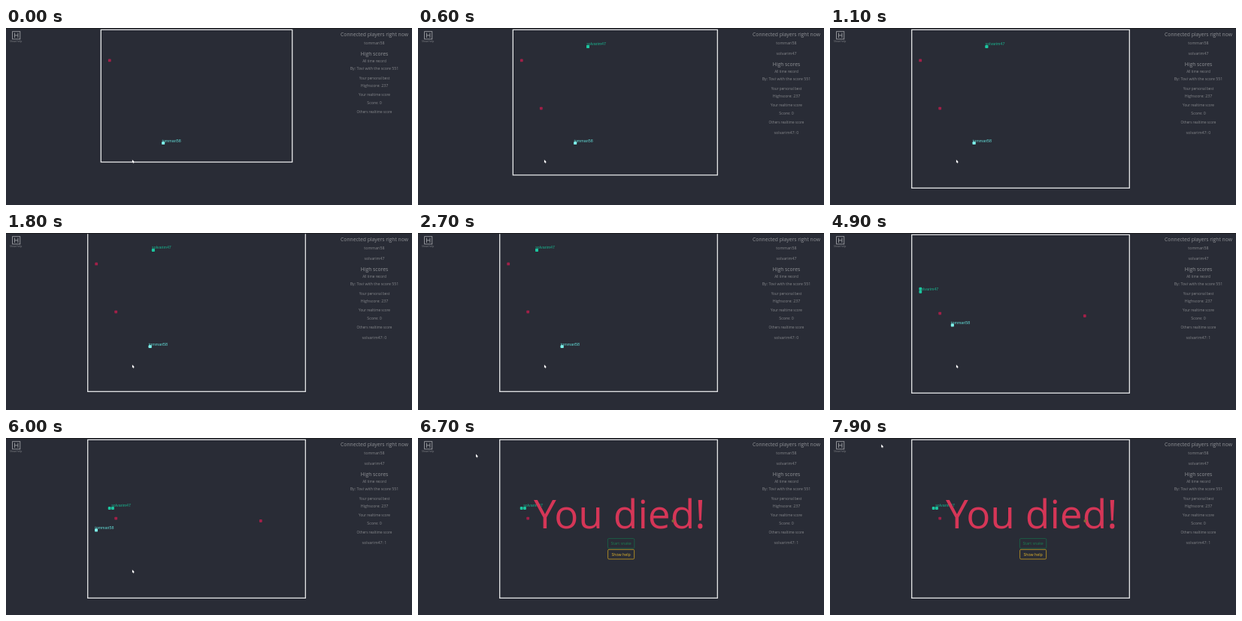
An HTML page that plays this animation: 540 px wide and 237 px high, repeating every 8000 ms.

```html
<!DOCTYPE html>
<html lang="en">
<head>
<meta charset="utf-8">
<title>Multiplayer snake</title>
<style>
  html, body { margin: 0; width: 100%; height: 100%; overflow: hidden; background: #292c36; }
  svg { display: block; width: 100%; height: 100%; }
  text { font-family: "Open Sans", "Noto Sans", sans-serif; font-size: 5.28px; }
  .side text { fill: #85878b; text-anchor: middle; }
  .side .title { font-size: 6.74px; fill: #919397; }
  .side .sub { font-size: 4.67px; }
  .label { font-family: "Liberation Sans", Arial, sans-serif; font-size: 5.35px; }
  .mid { text-anchor: middle; }
</style>
</head>
<body>
<svg viewBox="0 0 540 237">
  <defs><clipPath id="view"><rect y="1.2" width="540" height="236"/></clipPath></defs>
  <rect width="540" height="237" fill="#292c36"/>
  <rect width="540" height="1.1" fill="#1c1d21"/>

  <g fill="none" stroke="#a9abae" stroke-width=".8">
    <rect x="8.6" y="4.7" width="10.2" height="10.2"/>
    <path d="M11.5 6.6V13M15.9 6.6V13M11.5 9.8H15.9"/>
  </g>
  <text class="mid" x="13.2" y="18.8" fill="#85878b" style="font-size:3.4px">Show help</text>

  <g class="side" id="side"></g>

  <g clip-path="url(#view)">
    <g id="board">
      <rect id="frame" x="108.7" y="2.3" fill="none" stroke="#e6e7e9" stroke-width="1.3"/>
      <g id="pieces"></g>
    </g>
  </g>

  <g id="died">
    <text class="mid" x="268.3" y="120.6" fill="#d53657" style="font-size:53.2px">You died!</text>
    <rect x="337.6" y="109.3" width="3.4" height="3.4" rx=".8" fill="#806a38"/>
    <rect x="252.4" y="134.6" width="35.4" height="13.2" rx="1.4" fill="none" stroke="#17694a" stroke-width=".8"/>
    <text class="mid" x="270.1" y="143.1" fill="#1a8154">Start snake</text>
    <rect x="252.6" y="149.3" width="35" height="12.8" rx="1.4" fill="none" stroke="#c79c22" stroke-width=".8"/>
    <text class="mid" x="270.1" y="157.6" fill="#e2b52c">Show help</text>
  </g>

  <path id="cursor" d="M0 0V4.3L1 3.5L1.7 5L2.4 4.7L1.8 3.3H3.1Z" fill="#fff"/>
</svg>
<script>
const LOOP = 8000, TICK = 100;
const JOIN = 200, CENTERED = 1100, ATE = 4000, DEATH = 6400;
const ME = "tommari58", RIVAL = "solvarim47";
const $ = id => document.getElementById(id);

function add(parent, tag, attrs, text = "") {
  const node = document.createElementNS("http://www.w3.org/2000/svg", tag);
  for (const key in attrs) node.setAttribute(key, attrs[key]);
  node.textContent = text;
  parent.append(node);
  return node;
}
const show = (node, on) => node.setAttribute("visibility", on ? "visible" : "hidden");
const move = (node, x, y) => node.setAttribute("transform", `translate(${x} ${y})`);

// Corner points: [time, x, y]
const myPath = [
  [0, 191.6, 154.2], [3500, 191.6, 154.2], [3800, 191.6, 141.2], [4200, 191.6, 123.4],
  [4900, 162.8, 123.4], [6000, 120, 123.4], [6200, 111.6, 123.4], [6300, 108.4, 123.4]
];
const rivalPath = [
  [0, 208.4, 25], [1500, 208.4, 25], [2700, 158, 25], [3500, 124.7, 25], [3800, 124.7, 38.2],
  [3900, 120.3, 38.2], [4900, 120.3, 78.8], [5300, 120.3, 94], [5800, 142, 94]
];
const cursorPath = [
  [0, 167.9, 176.2], [6000, 167.9, 176.2], [6300, 146, 134], [6600, 88, 38],
  [6800, 66, 5], [7000, 68.2, 8.4]
];

function at(path, t) {
  const next = path.findIndex(p => p[0] > t);
  if (next < 0) return path[path.length - 1].slice(1);
  const [t0, x0, y0] = path[next - 1], [t1, x1, y1] = path[next];
  const k = (t - t0) / (t1 - t0);
  return [x0 + (x1 - x0) * k, y0 + (y1 - y0) * k];
}

const cell = (parent, fill) =>
  add(parent, "rect", { x: -1.9, y: -1.9, width: 3.8, height: 3.8, rx: 0.9, fill });

function makeFood(x, y) {
  const node = cell($("pieces"), "#a12048");
  move(node, x, y);
  return node;
}

function makeSnake(name, body, ink) {
  const group = add($("pieces"), "g", {});
  const label = add(group, "text", { class: "label", fill: ink }, name);
  return { group, label, tail: cell(group, body), head: cell(group, body) };
}

function drawSnake(snake, path, t, visible, long) {
  show(snake.group, visible);
  const [x, y] = at(path, t);
  move(snake.head, x, y);
  move(snake.label, x - 1.8, y - 1.7);
  move(snake.tail, ...(long ? at(path, Math.min(t, path[path.length - 1][0]) - TICK) : [x, y]));
}

const line = (parent, y, text, cls = "") => add(parent, "text", { x: 490, y, class: cls }, text);
const side = $("side");
line(side, 11.4, "Connected players right now", "title");
line(side, 22.3, ME);
const rivalName = line(side, 36.3, RIVAL);
const scores = add(side, "g", {});
[
  [36.7, "High scores", "title"],
  [46, "All time record", "sub"],
  [56.4, "By: Tovi with the score 551"],
  [68.6, "Your personal best", "sub"],
  [79, "Highscore: 237"],
  [91.4, "Your realtime score", "sub"],
  [101.9, "Score: 0"],
  [114.2, "Others realtime score", "sub"]
].forEach(row => line(scores, ...row));
const rivalScore = line(side, 141.6, "");

const firstFood = makeFood(120.2, 43.4);
const secondFood = makeFood(146.2, 107.6);
const newFood = makeFood(338.8, 111);
const rival = makeSnake(RIVAL, "#1cc6a0", "#19b48f");
const me = makeSnake(ME, "#7cefe8", "#62dcd6");

function draw(now) {
  const t = Math.floor((now % LOOP) / TICK) * TICK;
  const joined = t >= JOIN, dead = t >= DEATH;

  // The board grows one cell per tick, then is centred again.
  const grown = Math.min(8, Math.max(0, (t - JOIN) / TICK)) / 8;
  $("frame").setAttribute("width", 254.4 + 35.2 * grown);
  $("frame").setAttribute("height", 177.2 + 34.8 * grown);
  const scrolled = t >= 1500 && t < 4200;
  move($("board"), t < CENTERED ? 17.6 : 0, scrolled ? -2 : 0);

  show(firstFood, t < ATE);
  show(secondFood, joined);
  show(newFood, t >= ATE && !dead);
  drawSnake(me, myPath, t, !dead, false);
  drawSnake(rival, rivalPath, t, joined, t >= ATE);

  show(rivalName, joined);
  show(rivalScore, joined);
  move(scores, 0, joined ? 14 : 0);
  rivalScore.textContent = `${RIVAL}: ${t >= ATE ? 1 : 0}`;

  show($("died"), dead);
  move($("cursor"), ...at(cursorPath, t));
}

const start = performance.now();
function loop() {
  draw(performance.now() - start);
  requestAnimationFrame(loop);
}
loop();
</script>
</body>
</html>
```
